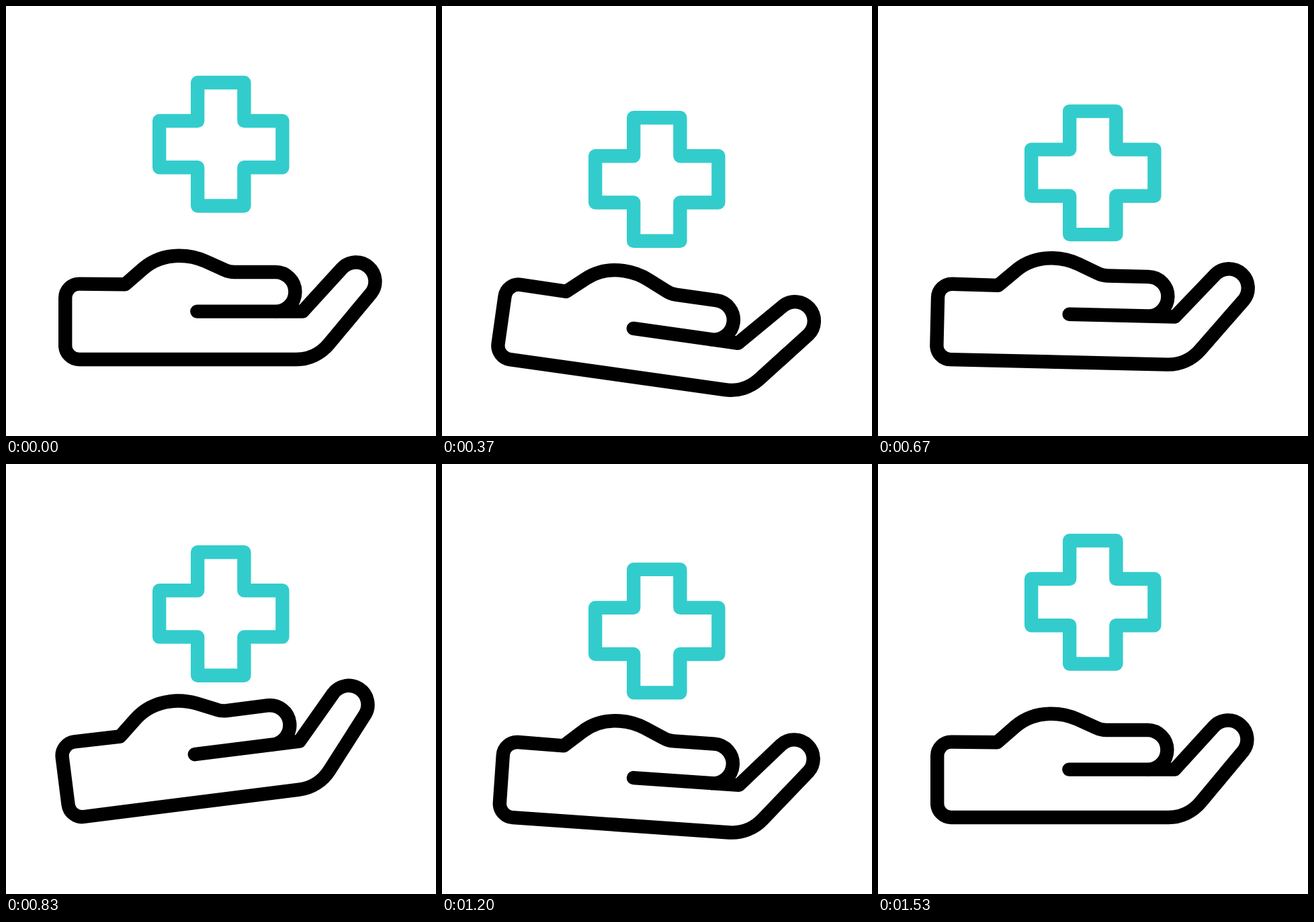
Write an HTML page that moves like this. It is 640 px wide and 640 px high and loops after 1.67 s.

```html
<!DOCTYPE html>
<html lang="en">
<head>
<meta charset="utf-8">
<title>Caring hand</title>
<style>
  html, body { margin: 0; width: 100%; height: 100%; overflow: hidden; background: #fff; }
  svg { display: block; width: 100%; height: 100%; }
  path { fill: none; stroke-width: 20.4; stroke-linecap: round; stroke-linejoin: round; }
</style>
</head>
<body>
<svg viewBox="0 0 640 640">
  <path id="cross" stroke="#33cccc"
    d="M285.2 114H354.4V171H411.4V240.2H354.4V297.5H285.2V240.2H228.2V171H285.2Z"/>
  <path id="hand" stroke="#000"
    d="M284.3 454.6H441.5L500.4 390.2A28.5 28.5 0 0 1 543.4 427.5L480.5 503
       C468.5 517.5 451 526 432 526H109A20.8 20.8 0 0 1 88.2 505.2V434.4
       A20.8 20.8 0 0 1 109 413.6L177.5 414.2L204 391
       C219 378 238 371.7 258 371.7C271.5 371.7 285 374.6 297 380L325 392.6
       C329.6 394.9 334.6 396 340 396H401A29.4 29.4 0 0 1 401 454.8"/>
</svg>
<script>
  const LOOP = 1670;
  const keys = [4.1, 14.5, 25.1, 35.4, 45.6]; // in steps of 1/30 s
  const tilt = [0, 10.9, -7.2, 4, 0];
  const drop = [0, 71, 17.2, 43.3, 0];
  const cross = document.getElementById('cross');
  const hand = document.getElementById('hand');

  const ease = u => u * u * (3 - 2 * u);

  function sample(values, n) {
    if (n <= keys[0]) return values[0];
    for (let i = 1; i < keys.length; i++) {
      if (n < keys[i]) {
        const u = (n - keys[i - 1]) / (keys[i] - keys[i - 1]);
        return values[i - 1] + (values[i] - values[i - 1]) * ease(u);
      }
    }
    return values[values.length - 1];
  }

  function draw(ms) {
    // 30 steps per second, on a clock of 10 ms ticks
    const n = Math.floor((Math.floor((ms % LOOP) / 10) + 0.5) * 0.3);
    cross.setAttribute('transform', `translate(0 ${sample(drop, n)})`);
    hand.setAttribute('transform', `rotate(${sample(tilt, n)} 104.5 471)`);
  }

  const start = performance.now();
  function tick() {
    draw(performance.now() - start);
    requestAnimationFrame(tick);
  }
  tick();
</script>
</body>
</html>
```
